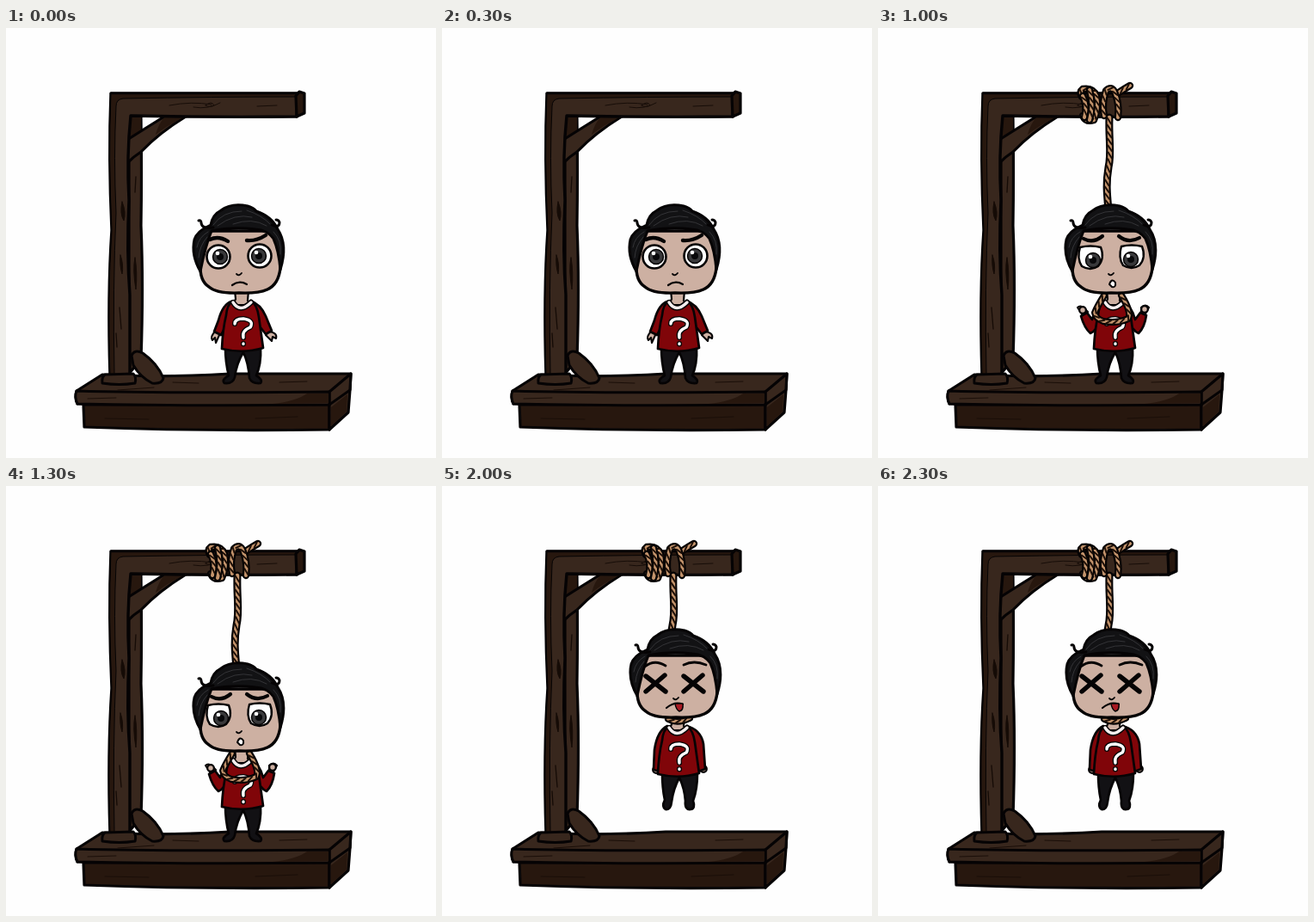
An HTML page that plays this animation: 500 px wide and 500 px high, repeating every 2500 ms.

```html
<!DOCTYPE html>
<html lang="en">
<head>
<meta charset="utf-8">
<title>Guessing game</title>
<style>
html, body { margin: 0; width: 100%; height: 100%; overflow: hidden; background: #fefefe; }
svg { display: block; width: 100%; height: 100%; }
</style>
</head>
<body>
<svg id="stage" viewBox="0 0 500 500"></svg>
<script>
const stage = document.getElementById('stage');
const INK = '#050304', SKIN = '#cdb0a2', RED = '#800509', WOOD = '#38271d', DARK = '#27170e', ROPE = '#c4946c', CLOTH = '#121114';

const shape = (d, fill, width = 2.7, stroke = INK) =>
  `<path d="${d}" fill="${fill}" stroke="${stroke}" stroke-width="${width}" stroke-linejoin="round" stroke-linecap="round"/>`;
const line = (d, width = 2, stroke) => shape(d, 'none', width, stroke);
const dot = (x, y, r, fill, width = 0) =>
  `<circle cx="${x}" cy="${y}" r="${r}" fill="${fill}" stroke="${INK}" stroke-width="${width}"/>`;
const group = (dx, dy, content) => `<g transform="translate(${dx} ${dy})">${content}</g>`;

// A tan cord with slanted twist marks along its length
function rope(d, width = 4.6) {
  const path = document.createElementNS('http://www.w3.org/2000/svg', 'path');
  path.setAttribute('d', d);
  const length = path.getTotalLength(), half = width / 2;
  let twists = '';
  for (let s = 4; s < length - 2; s += 8) {
    const a = path.getPointAtLength(s - 1), b = path.getPointAtLength(s + 1);
    const step = Math.hypot(b.x - a.x, b.y - a.y) || 1;
    const ux = (b.x - a.x) / step * half, uy = (b.y - a.y) / step * half;
    const x = (a.x + b.x) / 2, y = (a.y + b.y) / 2;
    twists += `M${x - 1.5 * ux - uy} ${y - 1.5 * uy + ux}L${x + 1.5 * ux + uy} ${y + 1.5 * uy - ux}`;
  }
  return line(d, width + 4.4) + line(d, width, ROPE) + line(twists, 2, '#1d0f07');
}

const gallows =
  // rear post and brace
  shape('M143 104L157 104Q158 170 157 230Q160 300 157 385L143 402Z', WOOD, 3.2) +
  shape('M143 104L157 104L157 140L143 156Z', DARK, 0) +
  shape('M141 130Q163 116 184 103L209 103Q178 122 157 144Q149 149 141 157Z', WOOD, 3.2) +
  shape('M184 104L206 104Q188 113 174 124Q177 112 184 104Z', DARK, 0) +
  // front post and beam
  shape('M122 76L340 76L338 103Q240 104 145 102Q140 150 143 200Q140 260 144 310L144 404L121 404Q118 310 123 235Q119 150 122 76Z', WOOD, 3.4) +
  shape('M122 76L338 76L337 80Q240 80 136 82Q128 83 128 91Q125 150 128 215Q124 300 126 404L121 404Q118 310 123 235Q119 150 122 76Z', DARK, 1) +
  shape('M337 79L341 74L347 76L347 99L338 103Z', DARK, 3.2) +
  line('M122 76L340 76', 2.6) +
  line('M190 90Q216 85 239 89M218 92Q235 95 249 87M232 90Q239 84 242 90Q237 93 232 90M292 91L315 90', 1, '#170d08') +
  shape('M135 202Q132 216 137 224Q140 214 135 202M133 264Q132 277 135 286Q137 275 133 264M150 267Q147 281 151 304Q153 284 150 267', '#150b06', 1, '#150b06') +
  line('M132 325L134 350M151 173L150 191M128 355L129 371', 1.3, '#150b06') +
  // platform
  shape('M82 422L112 403Q180 407 260 402L401 402L400 420L377 437L83 437Q80 430 82 422Z', WOOD, 3.2) +
  shape('M90 438L376 438L376 467Q220 469 91 464Z', DARK, 3.2) +
  shape('M376 423L401 402L400 421L398 447L376 467Z', WOOD, 3.2) +
  shape('M378 441L397 426L396 446L378 463Z', DARK, 0) +
  shape('M82 422Q180 425 376 423L376 438Q220 440 83 437Q79 429 82 422Z', WOOD, 3) +
  shape('M350 425L375 425L375 436L310 437Q337 434 350 425Z', DARK, 0) +
  line('M130 421L172 418M194 412L224 413M318 412L350 411M95 431L128 430M115 454L166 455M290 454L339 452', 1, '#1a0e08') +
  line('M376 438L400 421', 2.8) +
  shape('M146 381Q149 373 159 378Q176 390 183 407Q182 414 170 413Q156 406 148 392Z', WOOD, 3) +
  shape('M115 403L148 402Q152 406 150 413Q132 416 112 413Q111 406 115 403Z', WOOD, 3);

const knots =
  rope('M238 102Q242 110 251 107Q257 94 254 79Q250 69 238 71Q234 74 237 80', 4) +
  rope('M238 79Q244 90 240 104', 4) +
  rope('M246 72Q251 90 246 107', 4) +
  rope('M280 75Q286 71 293 67', 4) +
  rope('M263 102Q260 88 265 73Q271 67 275 74Q281 88 279 104', 4);

const hanging = end => rope(`M269 104C268 130 272 145 268 162C265 180 266 190 268 ${end}`);

const hair =
  shape('M226 283Q215 264 219 246Q222 236 238 229Q240 217 250 212Q262 203 281 207Q288 209 291 213Q309 219 316 234Q328 252 319 281Q317 258 311 245Q304 235 290 234Q263 231 239 236Q232 253 226 283Z', '#121214', 3) +
  line('M241 232Q228 234 227 227Q227 223 224 224M309 229Q318 233 318 226Q317 223 314 223', 3) +
  line('M241 229Q252 213 274 213M246 230Q266 215 286 220M264 228Q286 220 303 230M222 255Q224 243 235 237M224 267Q225 253 234 243M311 237Q321 247 319 263M280 212Q298 218 307 228', .9, '#38383b');

const headBase =
  shape('M228 236L314 236Q319 256 319 279Q317 298 304 304Q293 309 271 308Q245 309 236 301Q225 294 226 275Z', SKIN, 3.4) + hair;
const nose = line('M268 286Q271 289 274 285', 1.8);

function eye(x, y, ix, iy, flat) {
  const white = flat
    ? shape(`M${x - 12} ${y - 11}Q${x} ${y - 14} ${x + 12} ${y - 11}Q${x + 17} ${y + 2} ${x + 9} ${y + 11}Q${x} ${y + 17} ${x - 10} ${y + 11}Q${x - 16} ${y + 2} ${x - 12} ${y - 11}Z`, '#fff', 2.4)
    : dot(x, y, 13.5, '#fff', 2.6);
  return white + dot(ix, iy, 8.5, '#39393b', 1.5) + dot(ix, iy, 4, '#08080a') + dot(ix - 3, iy - 4, 2.3, '#fff');
}
const eyes = (x1, y1, x2, y2, flat) => eye(247, 266, x1, y1, flat) + eye(295, 265, x2, y2, flat);
const cross = (x, y) => `M${x - 11} ${y - 8}L${x + 12} ${y + 10}M${x + 11} ${y - 9}L${x - 11} ${y + 10}`;

const faces = {
  doubt: eyes(249, 266, 294, 265) + nose +
    line('M237 246Q247 241 258 248', 4.4) + line('M280 247Q291 248 302 241', 4.4) +
    line('M263 299Q271 293 280 298', 2.2),
  scared: eyes(251, 263, 291, 263, true) + nose +
    line('M239 245Q250 250 261 241M281 241Q291 250 304 244', 4.2) +
    shape('M262 300Q271 291 281 299Q272 302 262 300Z', '#fff', 2),
  gasp: eyes(250, 270, 294, 269, true) + nose +
    line('M239 245Q250 251 261 242M280 242Q291 251 304 244', 4.2) +
    shape('M269 298Q272 290 276 296Q277 302 272 301Z', '#fff', 2),
  pain: eyes(250, 271, 294, 271, true) + nose +
    line('M239 248Q252 243 262 244M282 244Q293 243 304 249', 4.2) +
    shape('M264 297Q273 289 283 297Q284 302 278 302Q272 297 264 297Z', '#fff', 2.2) +
    shape('M271 297Q278 294 282 301Q276 303 271 297Z', '#a8303a', 1),
  out: line(cross(247, 268) + cross(291, 268), 5.4) + nose +
    line('M235 249Q246 240 259 248M280 247Q292 241 306 247', 2.8) +
    line('M260 297Q270 289 279 293', 2.2) +
    shape('M270 292L279 292Q280 300 275 301Q271 299 270 292Z', '#a71922', 1.5)
};

const legsStanding =
  shape('M255 371L296 371Q297 391 291 404Q299 409 296 413Q286 414 283 407Q282 390 276 377Q268 390 266 406Q264 414 254 413Q250 409 259 404Q255 389 255 371Z', CLOTH);
const legsHanging =
  shape('M256 371L297 371Q297 391 292 404Q295 413 289 414Q282 415 283 404Q282 390 276 377Q269 390 267 405Q266 415 260 414Q255 411 259 403Q256 389 256 371Z', CLOTH);

const hand = (x, y) => dot(x, y, 3.8, SKIN, 2.2);
const arms = {
  down:
    shape('M243 353Q237 359 240 363L243 360L244 366L249 355Z', SKIN, 2.1) +
    shape('M305 353Q316 354 314 361L310 359L309 364L302 357Z', SKIN, 2.1) +
    shape('M262 318Q252 321 247 340L242 353L250 357L261 337Z', RED) +
    shape('M284 317Q296 321 302 335L309 352L302 356L288 338Z', RED),
  up:
    shape('M238 334L232 325Q235 322 239 325L244 330L243 335Z', SKIN, 2.1) + hand(238, 328) +
    shape('M306 334L306 325Q311 320 315 325L310 334Z', SKIN, 2.1) + hand(310, 327) +
    shape('M262 318Q253 323 249 339L243 331L236 335Q240 349 247 355Q253 353 262 337Z', RED) +
    shape('M284 318Q295 323 299 339L305 331L312 334Q310 348 303 355Q296 352 288 337Z', RED),
  limp: hand(249, 368) + hand(304, 367) +
    shape('M262 317Q250 323 247 345L246 368L255 370L262 340Z', RED) +
    shape('M284 317Q301 321 304 338L306 367L298 370L288 340Z', RED)
};

const torso =
  shape('M266 305L282 305L281 317L285 322L264 322L267 315Z', SKIN, 2.2) +
  shape('M263 318Q272 329 285 317Q292 322 294 336L299 372Q276 379 251 373Q252 350 256 334Q257 322 263 318Z', RED) +
  line('M264 319Q272 332 285 319', 6.4) + line('M264 319Q272 332 285 319', 3.4, '#f4eeee');
const questionPath = 'M266 344Q266 338 276 338Q289 340 284 348Q274 352 276 360M276 367L276 367.5';
const question = line(questionPath, 6) + line(questionPath, 3.4, '#fff');

const body = (arm, legs = legsStanding) => legs + arms[arm] + torso + question;
const head = face => headBase + faces[face];

const loop = rope('M264 222Q260 234 250 249Q241 264 244 283Q249 304 271 304Q294 303 298 283Q299 263 284 246Q274 235 272 222', 4.2) +
  rope('M263 204L274 205', 4) + rope('M262 211L275 212', 4) + rope('M262 218L275 219', 4) + rope('M265 225L272 225', 3);

const poses = [
  body('down') + head('doubt'),
  body('up') + head('scared') + hanging(204) + loop + knots,
  hanging(212) + knots + body('up') +
    rope('M263 311Q256 322 252 331Q253 338 262 341Q278 344 291 338Q295 330 283 311', 3.6) + head('gasp'),
  hanging(205) + knots + group(0, -8.5, body('up', legsHanging)) +
    rope('M264 301Q269 311 279 309Q287 307 288 300', 3.6) + group(0, -8, head('pain')),
  hanging(172) + knots + group(0, -38, body('limp', legsHanging)) +
    rope('M263 271Q274 277 288 270', 3.6) + group(1, -39, head('out'))
];

stage.innerHTML = gallows + poses.map(pose => `<g>${pose}</g>`).join('');
const layers = [...stage.children].slice(-poses.length);
const HOLD = 500;

function draw() {
  const current = Math.floor(performance.now() / HOLD) % layers.length;
  layers.forEach((layer, i) => layer.style.display = i === current ? '' : 'none');
  requestAnimationFrame(draw);
}
draw();
</script>
</body>
</html>
```
